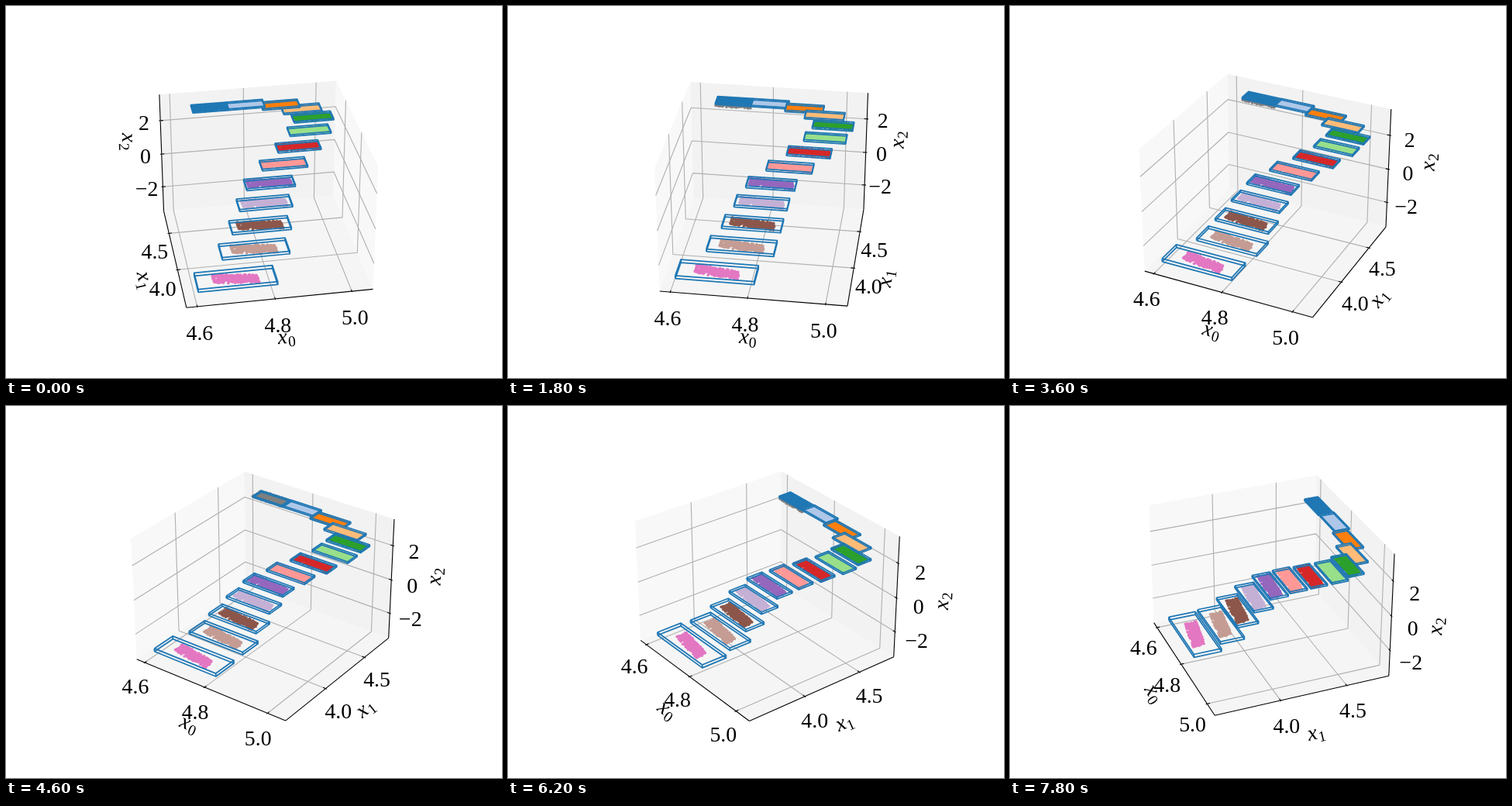
Animation, 640 px wide and 480 px high, one loop 8000 ms. Source, as an HTML page with a canvas:

```html
<!DOCTYPE html>
<html lang="en">
<head>
<meta charset="utf-8">
<style>
  html, body { margin: 0; width: 100%; height: 100%; overflow: hidden; background: #fff; }
  canvas { display: block; }
</style>
</head>
<body>
<canvas id="stage" width="640" height="480"></canvas>
<script>
const ctx = document.getElementById('stage').getContext('2d');
const STEP_MS = 200, STEPS = 40, ELEVATION = Math.PI / 6;
const SCALE = 1997.8, DISTANCE = 10, CENTER = [333, 237.4];
const HALF = [0.5952, 0.5952, 0.4464];      // half size of the axes box
const FONT = '"Liberation Serif", "Times New Roman", serif';
const BLUE = '#1f77b4', GRAY = '#7f7f7f';
const COLORS = [BLUE, '#aec7e8', '#ff7f0e', '#ffbb78', '#2ca02c', '#98df8a', '#d62728',
  '#ff9896', '#9467bd', '#c5b0d5', '#8c564b', '#c49c94', '#e377c2'];

const AXES = [
  { low: 4.5725, high: 5.0555, first: 4.6, step: 0.2, digits: 1 },
  { low: 3.517, high: 4.826, first: 4, step: 0.5, digits: 1 },
  { low: -3.521, high: 3.521, first: -2, step: 2, digits: 0 }
];

// Control points of the path seen from above, one for every second box
const PATH = [[-0.56, 0.42], [-0.28, 0.469], [0.19, 0.469], [0.39, 0.375], [0.257, 0.182],
  [0.035, -0.001], [-0.06, -0.192], [-0.256, -0.421], [-1.03, -0.908]];

function catmullRom(t) {
  const i = Math.min(Math.floor(t), PATH.length - 4), f = t - i;
  return [0, 1].map(axis => {
    const [a, b, c, d] = PATH.slice(i, i + 4).map(p => p[axis]);
    return b + f / 2 * (c - a + f * (2 * a - 5 * b + 4 * c - d + f * (3 * (b - c) + d - a)));
  });
}

// Boxes fall ever faster along the path and swell towards its end
const SETS = COLORS.map((color, index) => {
  const s = index / (COLORS.length - 1), swell = s ** 5;
  const width = 0.235 + 0.085 * s + 0.185 * swell;
  return {
    color, index,
    center: [...catmullRom(index / 2), 0.386 - 0.769 * s ** 2.04],
    size: [width, 0.098 + 0.025 * s + 0.067 * swell, width * 0.045],
    cloud: [Math.min(0.285, width * 0.96), 0.082],
    shear: 0.15 * s * s
  };
});

// Unit cloud shared by all sets
let seed = 7;
const random = () => (seed = (seed * 16807) % 2147483647) / 2147483647 - 0.5;
const CLOUD = Array.from({ length: 420 }, () => [random(), random(), random()]);

let sinA, cosA;
const sinE = Math.sin(ELEVATION), cosE = Math.cos(ELEVATION);

function depth([x, y, z]) {
  return DISTANCE - cosE * (cosA * x + sinA * y) - sinE * z;
}

function project(p) {
  const [x, y, z] = p, k = SCALE / depth(p);
  const right = -sinA * x + cosA * y;
  const up = -sinE * (cosA * x + sinA * y) + cosE * z;
  return [CENTER[0] + k * right, CENTER[1] - k * up];
}

// Axes point from coordinates in -1..1
const corner = (...s) => s.map((v, i) => v * HALF[i]);

function trace(points) {
  ctx.beginPath();
  points.map(project).forEach(([x, y], i) => i ? ctx.lineTo(x, y) : ctx.moveTo(x, y));
}

function stroke(points, color, width) {
  trace(points);
  ctx.strokeStyle = color;
  ctx.lineWidth = width;
  ctx.stroke();
}

function pane(points, color) {
  trace(points);
  ctx.fillStyle = color;
  ctx.fill();
}

function axisTitle(index, point, from, to) {
  const [x, y] = project(point), [x1, y1] = project(from), [x2, y2] = project(to);
  let angle = Math.atan2(y2 - y1, x2 - x1);
  if (angle > Math.PI / 2) angle -= Math.PI;
  if (angle < -Math.PI / 2) angle += Math.PI;
  ctx.save();
  ctx.translate(x, y);
  ctx.rotate(angle);
  ctx.textAlign = 'left';
  ctx.font = `italic 27.8px ${FONT}`;
  ctx.fillText('x', -11.5, 5.5);
  ctx.font = `19.4px ${FONT}`;
  ctx.fillText(index, 1.5, 10);
  ctx.restore();
}

function drawAxis(index, side) {
  const base = [[0, -1, -1], [side, 0, -1], [side, 1, 0]][index];
  const at = value => corner(...base.map((v, i) => i === index ? value : v));
  // Moves a point away from the centre, except along its own axis
  const outward = (p, amount) => p.map((v, i) =>
    i === index ? v : v + Math.sign(v) * amount * HALF[i] / HALF[0]);
  const tickDir = index === 0 ? 1 : 0;
  const shifted = (p, amount) => p.map((v, i) => i === tickDir ? v + Math.sign(v) * amount : v);
  const { low, high, first, step, digits } = AXES[index];

  stroke([at(-1), at(1)], '#000', 1.11);
  for (let value = first; value < high; value += step) {
    const t = 2 * (value - low) / (high - low) - 1, p = at(t);
    const grid = [
      [[t, -1, -1], [t, 1, -1], [t, 1, 1]],
      [[side, t, -1], [-side, t, -1], [-side, t, 1]],
      [[side, 1, t], [-side, 1, t], [-side, -1, t]]
    ][index];
    stroke(grid.map(c => corner(...c)), '#b0b0b0', 1.11);
    stroke([shifted(p, 0.0095), shifted(p, -0.019)], '#000', 1.11);
    const [x, y] = project(outward(p, 0.0988));
    ctx.font = `27.8px ${FONT}`;
    ctx.textAlign = 'center';
    ctx.fillStyle = '#000';
    ctx.fillText(value.toFixed(digits).replace('-', '\u2212'), x, y + 19);
  }
  axisTitle(index, outward(at(0), 0.2148), at(-1), at(1));
}

function drawCloud({ center, size, cloud, shear }, color, grow = 0, drop = 0) {
  ctx.beginPath();
  for (const [a, b, c] of CLOUD) {
    const dx = a * (cloud[0] + grow), dy = b * (cloud[1] + grow) - shear * dx;
    const [x, y] = project([center[0] + dx, center[1] + dy, center[2] + c * size[2] * 0.6 - drop]);
    ctx.moveTo(x + 1.8, y);
    ctx.arc(x, y, 1.8, 0, 2 * Math.PI);
  }
  ctx.fillStyle = color;
  ctx.fill();
}

function drawBox({ center, size }) {
  const vertex = (...s) => center.map((v, i) => v + s[i] * size[i] / 2);
  const ring = z => [[-1, -1], [1, -1], [1, 1], [-1, 1], [-1, -1]].map(([x, y]) => vertex(x, y, z));
  stroke(ring(-1), BLUE, 1.75);
  stroke(ring(1), BLUE, 1.75);
  for (const x of [-1, 1])
    for (const y of [-1, 1]) stroke([vertex(x, y, -1), vertex(x, y, 1)], BLUE, 1.75);
}

// A gray cloud lies under the first set and passes over it for a while
function drawSet(set, step) {
  const grayShown = set.index === 0 && step > 5 && step < 36;
  const grayOnTop = grayShown && step > 18 && step < 29;
  if (grayShown && !grayOnTop) drawCloud(set, GRAY, 0.01, 0.018);
  drawCloud(set, set.color);
  if (grayOnTop) drawCloud(set, GRAY, 0.02);
  drawBox(set);
}

function draw(step) {
  const degrees = -100 + 2 * step, azimuth = degrees * Math.PI / 180;
  sinA = Math.sin(azimuth);
  cosA = Math.cos(azimuth);
  const side = degrees < -90 ? -1 : 1;

  ctx.fillStyle = '#fff';
  ctx.fillRect(0, 0, 640, 480);
  ctx.lineJoin = 'round';
  const square = [[-1, -1], [1, -1], [1, 1], [-1, 1]];
  pane(square.map(([a, b]) => corner(-side, a, b)), '#f8f8f8');
  pane(square.map(([a, b]) => corner(a, 1, b)), '#f2f2f2');
  pane(square.map(([a, b]) => corner(a, b, -1)), '#f5f5f5');
  for (let i = 0; i < 3; i++) drawAxis(i, side);

  [...SETS].sort((a, b) => depth(b.center) - depth(a.center)).forEach(s => drawSet(s, step));
}

let shown = -1;
function tick() {
  const step = Math.floor(performance.now() / STEP_MS) % STEPS;
  if (step !== shown) draw(shown = step);
  requestAnimationFrame(tick);
}
tick();
</script>
</body>
</html>
```
